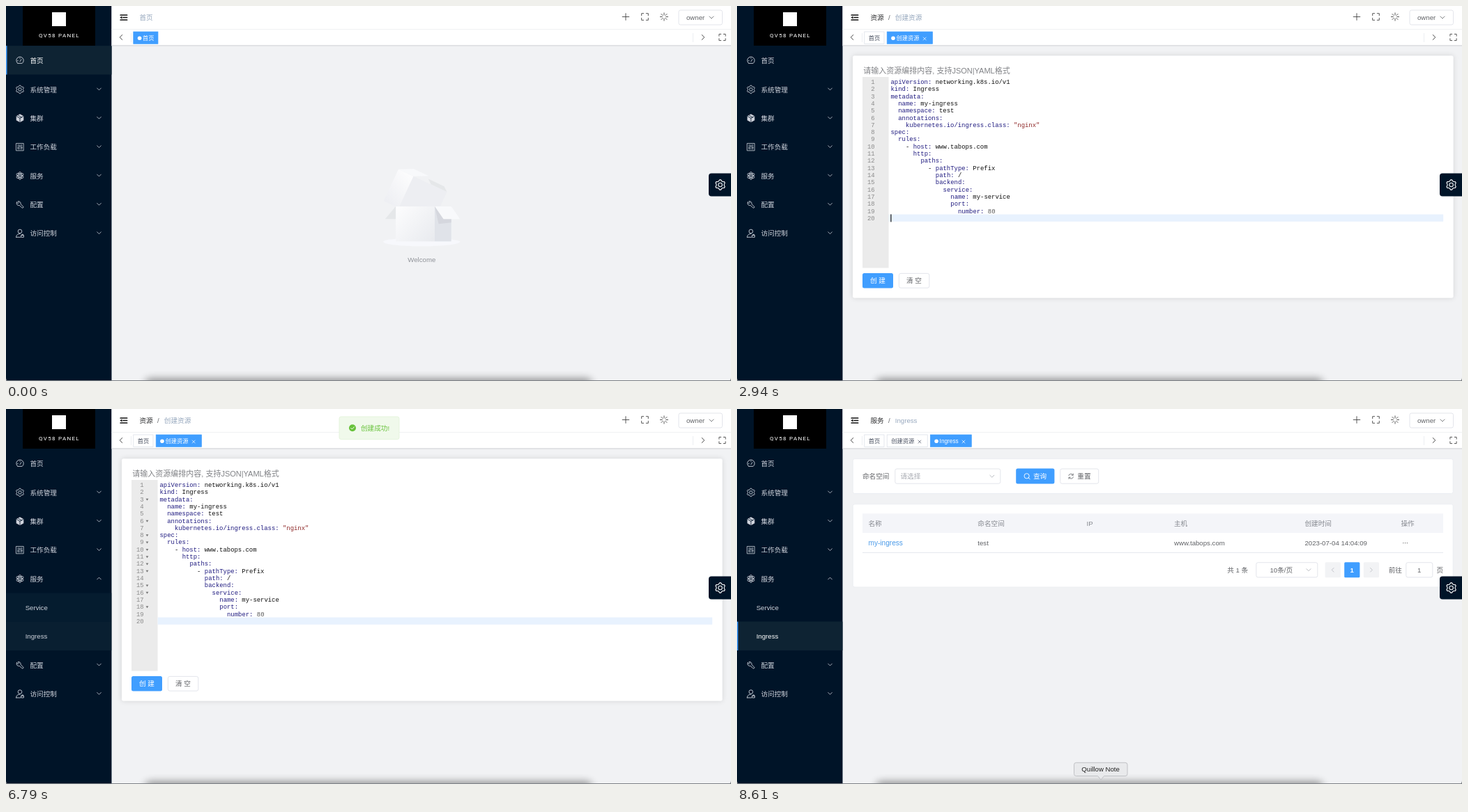
These frames come from a looping animation (1040 by 539 pixels, 9030 ms). An HTML page:

```html
<!DOCTYPE html>
<html lang="zh">
<head>
<meta charset="utf-8">
<title>Ingress</title>
<style>
html, body { margin: 0; width: 100%; height: 100%; overflow: hidden; background: #f1f2f4; }
svg { display: block; width: 1040px; height: 539px; }
text { font-family: "Liberation Sans", "Noto Sans CJK SC", "Noto Sans CJK", sans-serif; white-space: pre; }
.mono { font-family: "Liberation Mono", monospace; }
.brand { font-family: Roboto, sans-serif; letter-spacing: 1.3px; }
</style>
</head>
<body>
<svg id="stage" viewBox="0 0 1040 539" xmlns="http://www.w3.org/2000/svg"></svg>
<script>
const LOOP = 9030, NAVY = '#001428', BLUE = '#409eff', ROW = 41.35;

// Markup helpers; text y is the visual middle of the line.
const text = (x, y, s, fill = '#606266', size = 9.65, more = '') =>
  `<text x="${x}" y="${y + size * 0.37}" font-size="${size}" fill="${fill}" ${more}>${s}</text>`;
const mid = (x, y, s, fill, size, more = '') => text(x, y, s, fill, size, 'text-anchor="middle" ' + more);
const rect = (x, y, w, h, fill, more = '') =>
  `<rect x="${x}" y="${y}" width="${w}" height="${h}" fill="${fill}" ${more}/>`;
const box = (x, y, w, h, r = 2.5, fill = '#fff', stroke = '#dcdfe6') =>
  rect(x, y, w, h, fill, `rx="${r}" stroke="${stroke}" stroke-width=".8"`);
const line = (d, color, w = 0.9, more = '') =>
  `<path d="${d}" fill="none" stroke="${color}" stroke-width="${w}" stroke-linecap="round" stroke-linejoin="round" ${more}/>`;
const circle = (x, y, r, fill, more = '') => `<circle cx="${x}" cy="${y}" r="${r}" fill="${fill}" ${more}/>`;
const ring = (x, y, r, color, w = 0.9) => circle(x, y, r, 'none', `stroke="${color}" stroke-width="${w}"`);
const group = (id, body, more = '') => `<g id="${id}" ${more}>${body}</g>`;
const move = (x, y, body) => `<g transform="translate(${x} ${y})">${body}</g>`;

const down = (x, y, color, s = 3) => line(`M${x - s} ${y - s / 2}l${s} ${s}l${s} ${-s}`, color, 0.8);
const cross = (x, y, color, s = 2) =>
  line(`M${x - s} ${y - s}l${2 * s} ${2 * s}M${x + s} ${y - s}l${-2 * s} ${2 * s}`, color, 0.7);
const expand = (x, y, s = 4.8) => {
  let d = '';
  for (const a of [-1, 1]) for (const b of [-1, 1])
    d += `M${x + a * s} ${y + b * 1.8}V${y + b * s}H${x + a * 1.8}`;
  return line(d, '#444', 0.9);
};
const gear = (x, y, r, color, w) => {
  let pts = '';
  for (let i = 0; i < 24; i++) {
    const a = (i - 0.5) * Math.PI / 12 + Math.PI / 6, k = r * (i % 4 < 2 ? 1 : 0.78);
    pts += `${x + k * Math.cos(a)},${y + k * Math.sin(a)} `;
  }
  return `<polygon points="${pts}" fill="none" stroke="${color}" stroke-width="${w}" stroke-linejoin="round"/>` +
    ring(x, y, r * 0.38, color, w);
};

// Sidebar
const PALE = '#cfd3dc';
const icons = [
  line('M-3.2 4.2A5.2 5.2 0 1 1 3.2 4.2H-3.2M0 1.5L2-1.5M-3.4 .4h.6M0-3.2v.5', PALE),
  gear(0, 0, 5.8, PALE, 0.9),
  `<path d="M0-6L5.3-3V3L0 6L-5.3 3V-3Z" fill="${PALE}"/>` + line('M-4.6-2.6L0 0L4.6-2.6M0 0V5.4M-2.4-4L2.4-1.3', NAVY, 0.8),
  line('M-5.2-5.2H5.2V5.2H-5.2ZM-2.6-3.4V3.4M0-3.4V3.4M2.6-3.4V3.4M-3.4 1.4h1.6M-.8-1.4h1.6M1.8 1h1.6', PALE, 0.8),
  [30, 90, 150].map(a => `<ellipse rx="5.5" ry="2.6" fill="none" stroke="${PALE}" stroke-width=".8" transform="rotate(${a})"/>`).join('') +
    ring(0, 0, 1.3, PALE, 0.8),
  line('M-4.6-3.2L-2.6-1.6L-1.4-2.8L-2.8-4.6A3.2 3.2 0 0 1 1-.6L4.6 2.8A1.2 1.2 0 0 1 2.8 4.5L-.8 1.2A3.2 3.2 0 0 1-4.6-3.2Z', PALE),
  ring(0, -2.8, 2.8, PALE) + line('M-5.4 5.6C-5.2 2-3 .8 0 .8M-5.4 5.6H.6M2 2.8H5.4V5.6H2ZM2.8 2.8V1.6H4.6V2.8', PALE)
];
const labels = ['首页', '系统管理', '集群', '工作负载', '服务', '配置', '访问控制'];
const item = i => {
  const y = 78.2 + i * ROW + (i ? 0.4 : 0);
  return move(20, y, icons[i]) + text(34.5, y, labels[i], PALE, 9.65, i ? '' : 'id="homeLabel"') +
    (i ? group('arrow' + i, down(0, 0, PALE, 2.8), `transform="translate(133.5 ${y - 0.5})"`) : '');
};
const activeRow = (id, y) => group(id, rect(0, y, 151.5, ROW, '#0e2333') + rect(0, y, 1.5, ROW, BLUE));
const subTop = 264.3;
const sidebar =
  rect(0, 0, 151.5, 539, NAVY) + rect(24, 0, 104, 57, '#000') + rect(66, 9, 20, 20, '#fff') +
  mid(76.5, 42.5, 'QV58 PANEL', '#fff', 8, 'class="brand"') +
  activeRow('homeRow', 57.2) + [0, 1, 2, 3, 4].map(item).join('') +
  `<clipPath id="subClip"><rect id="subBox" x="0" y="${subTop}" width="151.5" height="0"/></clipPath>` +
  `<g clip-path="url(#subClip)">` +
  rect(0, subTop, 151.5, ROW, '#051c2f', 'id="hover1"') + rect(0, subTop + ROW, 151.5, ROW, '#0a2032', 'id="hover2"') +
  activeRow('ingressRow', subTop + ROW) +
  text(27.7, 285, 'Service', PALE) + text(27.7, 326.5, 'Ingress', PALE, 9.65, 'id="ingressLabel"') + '</g>' +
  group('lower', item(5) + item(6));

// Header
const crumbs = (a, b) => text(191.5, 16.5, a, '#303133') + text(217, 16.5, '/', '#606266') + text(226.8, 16.5, b, '#97a8be');
const tag = (x, w, s, live, closable) => {
  const ink = live ? '#fff' : '#495060', tx = x + (live ? 13.3 : 6);
  return rect(x, 37, w, 17.3, live ? BLUE : '#fff', `stroke="${live ? BLUE : '#d8dce5'}" stroke-width=".7"`) +
    (live ? circle(x + 8.8, 46.2, 2.8, '#fff') : '') + text(tx, 46.2, s, ink, 8.27) +
    (closable ? cross(x + w - 11.3, 47, ink) : '');
};
const spark = [0, 1, 2, 3, 4, 5, 6, 7].map(i => {
  const a = i * Math.PI / 4, c = Math.cos(a), s = Math.sin(a);
  return `M${944 + 2.6 * c} ${15.5 + 2.6 * s}L${944 + 5.6 * c} ${15.5 + 5.6 * s}`;
}).join('');
const header =
  rect(151.5, 0, 888.5, 57, '#fff') + rect(151.5, 33, 888.5, 0.8, '#eceef0') + rect(151.5, 56.3, 888.5, 1.2, '#d3d5d9') +
  line('M164.2 13H173.6M168 16.5H173.6M164.2 20H173.6', '#111', 1.7) +
  `<path d="M163.4 16.5L166.5 14.4V18.6Z" fill="#111"/>` +
  line('M884.2 15.5H893.8M889 10.7V20.3', '#444') + expand(916.5, 15.5) + line(spark, '#444') +
  box(965, 6, 62.5, 21) + text(976, 16.5, 'owner') + down(1012, 16.5, '#606266') +
  line('M166.8 41.5L163.2 45L166.8 48.5M998.2 41.5L1001.8 45L998.2 48.5', '#333') + expand(1027.5, 45, 4.6) +
  rect(179.3, 39, 0.7, 13, '#e4e7ed') + rect(985.3, 39, 0.7, 13, '#e4e7ed') +
  group('head0', text(191.5, 16.5, '首页', '#97a8be') + tag(182.8, 35.2, '首页', true)) +
  group('head1', crumbs('资源', '创建资源') + tag(182.8, 28.2, '首页') + tag(215.2, 65.3, '创建资源', true, true)) +
  group('head2', crumbs('服务', 'Ingress') + tag(182.8, 28.2, '首页') + tag(215.2, 58, '创建资源', false, true) +
    tag(277.3, 59, 'Ingress', true, true));

// Welcome page
const poly = (fill, points, more = '') => `<polygon fill="${fill}" points="${points}" ${more}/>`;
const welcome = `<g transform="translate(541 225.3) scale(1.396)">
  <path fill="#f7f8fc" d="M39.5 86C61.3 86 79 83.9 79 81.3C79 78.8 57.3 78 35.5 78C13.7 78 0 78.8 0 81.3C0 83.9 17.7 86 39.5 86Z"/>` +
  poly('#e5e7e9', '13,45 53,45 42,58 2,58') +
  '<g transform="translate(34.5 31.5) scale(-1 1) rotate(-25) translate(-27.5 -21.5)">' +
  poly('#e5e7e9', '0,7 18,7 23,3 5,3') + rect(0, 7, 38, 36, '#edeef2') + rect(38, 7, 17, 36, 'url(#sideFill)') +
  poly('#f8f9fb', '55,7 38,7 24,0 41,0') + '</g>' +
  rect(13, 45, 40, 36, 'url(#frontFill)') + rect(53, 45, 17, 36, '#e0e3e9') +
  poly('#d5d7de', '70,45 53,45 57,63 70,61.5') + poly('#f8f9fb', '70,45 53,45 62,58 79,58') + '</g>' +
  mid(596.3, 364.5, 'Welcome', '#909399');

// Editor page
const CH = 5.362, LH = 10.31;
const source = `apiVersion: networking.k8s.io/v1
kind: Ingress
metadata:
  name: my-ingress
  namespace: test
  annotations:
    kubernetes.io/ingress.class: "nginx"
spec:
  rules:
    - host: www.tabops.com
      http:
        paths:
          - pathType: Prefix
            path: /
            backend:
              service:
                name: my-service
                port:
                  number: 80
`.split('\n');
const folds = [3, 6, 8, 9, 10, 11, 12, 13, 15, 16, 18].filter(n => n !== 12).concat(12);
const lineY = n => 109 + (n - 1) * LH;
const mono = (x, y, s, fill, more = '') => text(x, y - 0.3, s, fill, CH / 0.6015, 'class="mono" ' + more);
const codeLine = (s, i) => {
  const m = s.match(/^( *)(- )?([^:]+:)(.*)$/);
  if (!m) return '';
  const [, pad, dash = '', key, value] = m;
  const ink = value.includes('"') ? '#8f2a2a' : /^ \d+$/.test(value) ? '#555' : '#111';
  return mono(220.5 + pad.length * CH, lineY(i + 1),
    `${dash}<tspan fill="#201c80">${key}</tspan><tspan fill="${ink}">${value}</tspan>`, '#111');
};
const gutterNo = n => mono(197.6, lineY(n), n, '#8b8b8b', 'text-anchor="end"');
const arrows = folds.map(n => `<path d="M200.6 ${lineY(n) - 0.9}h3.8l-1.9 3z" fill="#777"/>`).join('');
const editor =
  rect(166, 71.5, 861.5, 348, '#fff', 'rx="2.7" filter="url(#cardShadow)"') +
  text(181.3, 93, '请输入资源编排内容, 支持JSON|YAML格式', '#808286', 11) +
  rect(180, 102, 37.6, 274.5, '#ebebeb') +
  rect(217.6, 0, 795.6, LH, '#e8f2fe', 'id="current"') + gutterNo(1) +
  group('code', source.map(codeLine).join('') + source.slice(1).map((_, i) => gutterNo(i + 2)).join('')) +
  group('folds', arrows) + rect(220.3, 0, 1.2, 11, '#111', 'id="caret"') +
  rect(180, 384, 44, 21.6, BLUE, 'id="create" rx="2.5"') + mid(202, 394.8, '创 建', '#fff', 9.65, 'font-weight="500"') +
  box(232.4, 384.4, 43.4, 20.8) + mid(254, 394.8, '清 空', '#606266');

// List page
const titles = ['名称', '命名空间', 'IP', '主机', '创建时间', '操作'];
const columns = [188.5, 345.3, 501.5, 627, 814.5, 952.5];
const values = ['my-ingress', 'test', '', 'www.tabops.com', '2023-07-04 14:04:09', ''];
const list =
  box(166.2, 71.7, 861, 49.8, 2.7, '#fff', '#e9ebf0') + box(166.2, 136.8, 861, 119.2, 2.7, '#fff', '#e9ebf0') +
  text(180, 96.7, '命名空间') + box(226.8, 86, 151, 21.2) + text(234.5, 96.7, '请选择', '#a8abb2') + down(365.8, 96.7, '#a8abb2') +
  rect(400.2, 85.6, 55.2, 22, BLUE, 'rx="2.5"') + ring(415.6, 96.3, 3.6, '#fff') + line('M418.3 99L420.2 100.9', '#fff') +
  text(425, 96.7, '查询', '#fff', 9.65, 'font-weight="500"') +
  box(463.7, 86, 55, 21.2) + line('M475.8 95.6A3.4 3.4 0 0 1 482 95M482.2 93V95.2H480M482.4 97.8A3.4 3.4 0 0 1 476.2 98.4M476 100.4V98.2H478.2', '#606266', 0.8) +
  text(488.3, 96.7, '重置', '#606266', 9.65, 'font-weight="500"') +
  rect(180, 150.3, 833, 27.8, '#f4f5f9') + rect(180, 206, 833, 0.8, '#dfe3ea') +
  columns.map((x, i) => text(x, 164, titles[i], '#85888f') +
    text(x, 192, values[i], i ? '#606266' : '#4a9ae8', i ? 9.65 : 10.1)).join('') +
  [955.8, 958.6, 961.4].map(x => circle(x, 192.6, 0.7, '#666')).join('') +
  text(703.3, 231.3, '共 1 条') + box(744.8, 220.7, 88, 21.2) + text(764.5, 231.3, '10条/页') + down(820, 231.3, '#a8abb2') +
  rect(843.6, 220.3, 22.2, 22, '#f2f3f5', 'rx="1.5"') + rect(871.2, 220.3, 22.2, 22, BLUE, 'rx="1.5"') +
  rect(898.8, 220.3, 22.2, 22, '#f2f3f5', 'rx="1.5"') +
  line('M856 228.5L853.2 231.3L856 234.1M908.6 228.5L911.4 231.3L908.6 234.1', '#b4b7bd', 0.8) +
  mid(882.3, 231.3, '1', '#fff', 9.65, 'font-weight="700"') +
  text(934.7, 231.3, '前往') + box(959.8, 220.7, 38, 21.2) + mid(978.6, 231.3, '1') + text(1003.6, 231.3, '页');

// Overlays
const status = (id, w, s, size) => group(id,
  rect(-1, 524, w + 1, 16, '#dcdee1', 'rx="2" stroke="#b9bcc0" stroke-width=".7"') + text(3, 531, s, '#33363a', size));
const overlays =
  `<path d="M1040 240.5H1012a4 4 0 0 0-4 4V269.500a4 4 0 0 0 4 4H1040Z" fill="${NAVY}"/>` + gear(1024.6, 257, 7.2, '#fff', 1.1) +
  group('tip', `<path d="M889 26.800L892.500 31H885.500Z" fill="#303133"/>` + rect(864.4, 30, 49.6, 22.6, '#303133', 'rx="2.8"') +
    mid(889.2, 41.5, '创建资源', '#fff', 8.27)) +
  group('toast', box(478, 11, 86, 32.6, 2.7, '#f0f9eb', '#e1f3d8') + circle(497, 27.2, 5, '#67c23a') +
    line('M494.7 27.300L496.400 29L499.400 25.800', '#fff', 1) + text(509, 27.2, '创建成功!', '#67c23a')) +
  rect(200, 536, 640, 12, '#000', 'rx="6" opacity=".45" filter="url(#soft)"') +
  status('waiting', 348, 'Waiting for 10.192.104.101...', 8.4) +
  status('link', 199, '10.192.104.101:35999/#/k8s/services/service/list', 8.86) +
  rect(0, 538, 1040, 1, '#7d8186') +
  '<path d="M0 534Q0 539 5 539H0ZM1040 534Q1040 539 1035 539H1040Z" fill="#7d8186"/>' +
  group('dockTip', '<path d="M486.500 508.300H557a3 3 0 0 1 3 3V524.500a3 3 0 0 1-3 3H526.500L522 532.800L517.500 527.500H486.500a3 3 0 0 1-3-3V511.300a3 3 0 0 1 3-3Z" fill="#e9eaec" stroke="#b5b7ba" stroke-width=".8"/>' +
    mid(521.6, 517.8, 'Quillow Note', '#222'));

const defs = `<defs>
  <linearGradient id="sideFill" x1=".388" y1="0" x2=".612" y2="1"><stop stop-color="#fcfcfd"/><stop offset="1" stop-color="#eeeff3"/></linearGradient>
  <linearGradient id="frontFill" x1="0" y1=".095" x2="1" y2=".905"><stop stop-color="#fcfcfd"/><stop offset="1" stop-color="#e9ebef"/></linearGradient>
  <filter id="cardShadow" x="-5%" y="-5%" width="110%" height="110%"><feDropShadow dx="0" dy="0" stdDeviation="3.500" flood-opacity=".14"/></filter>
  <filter id="soft" x="-10%" y="-300%" width="120%" height="700%"><feGaussianBlur stdDeviation="6"/></filter>
</defs>`;

const stage = document.getElementById('stage');
stage.innerHTML = defs + rect(0, 0, 1040, 539, '#f1f2f4') +
  group('page0', welcome) + group('page1', editor) + group('page2', list) + sidebar + header + overlays;

const el = {};
stage.querySelectorAll('[id]').forEach(n => el[n.id] = n);

// Timing
const clamp = v => Math.max(0, Math.min(1, v));
const ease = x => {
  let lo = 0, hi = 1, s = 0.5;
  for (let i = 0; i < 20; i++) {
    s = (lo + hi) / 2;
    if (0.75 * s * (1 - s) + s ** 3 < x) lo = s; else hi = s;
  }
  return 0.3 * s * (1 - s) ** 2 + 3 * s * s * (1 - s) + s ** 3;
};
const ramp = (t, from, ms) => {
  const p = clamp((t - from) / ms);
  return p <= 0 ? 0 : p >= 1 ? 1 : ease(p);
};
const REST = [64, 158, 255], HOVER = [121, 187, 255], PRESS = [51, 126, 204];
const buttonKeys = [[0, REST], [3630, REST], [3730, HOVER], [3910, HOVER], [4000, PRESS], [4060, PRESS],
  [4210, HOVER], [5935, HOVER], [6035, REST], [LOOP, REST]];
const buttonColor = t => {
  const i = buttonKeys.findIndex(k => k[0] > t);
  const [t0, a] = buttonKeys[i - 1], [t1, b] = buttonKeys[i], p = (t - t0) / (t1 - t0);
  return `rgb(${a.map((v, j) => Math.round(v + (b[j] - v) * p))})`;
};
const alpha = (id, v) => {
  el[id].setAttribute('opacity', v);
  el[id].style.display = v > 0 ? '' : 'none';
};

function draw(t) {
  const route = t < 1400 ? 0 : t < 7210 ? 1 : 2;
  for (let i = 0; i < 3; i++) alpha('head' + i, route === i ? 1 : 0);
  alpha('page0', 1 - ramp(t, 1390, 360));
  alpha('page1', ramp(t, 1760, 360) - ramp(t, 7200, 430));
  alpha('page2', ramp(t, 7670, 370));

  alpha('homeRow', route === 0 ? 1 : 0);
  el.homeLabel.setAttribute('fill', route === 0 ? '#fff' : PALE);
  const open = ramp(t, 6070, 300), drop = open * 2 * ROW;
  el.subBox.setAttribute('height', drop);
  el.lower.setAttribute('transform', `translate(0 ${drop})`);
  el.arrow4.setAttribute('transform', `translate(133.5 ${243.5}) rotate(${180 * open})`);
  alpha('hover1', ramp(t, 6490, 100) * (route === 2 ? 0 : 1));
  alpha('hover2', ramp(t, 6700, 100));
  alpha('ingressRow', route === 2 ? 1 : 0);
  el.ingressLabel.setAttribute('fill', route === 2 ? '#fff' : PALE);

  const pasted = t >= 2940, caretLine = pasted ? 20 : 1;
  alpha('code', pasted ? 1 : 0);
  alpha('folds', t >= 3360 ? 1 : 0);
  alpha('caret', t >= 2660 && t < 3500 ? 1 : 0);
  el.caret.setAttribute('y', lineY(caretLine) - 5.5);
  el.current.setAttribute('y', lineY(caretLine) - 5.4);
  el.create.setAttribute('fill', buttonColor(t));

  alpha('tip', ramp(t, 1030, 230) - ramp(t, 1890, 210));
  alpha('waiting', ramp(t, 1470, 120) - clamp((t - 1640) / 215));
  alpha('link', ramp(t, 7270, 120) - clamp((t - 7790) / 250));
  const slide = ramp(t, 4260, 420) - ramp(t, 7230, 400);
  alpha('toast', clamp(ramp(t, 4260, 310) - ramp(t, 7230, 310)));
  el.toast.setAttribute('transform', `translate(0 ${-33 * (1 - slide)})`);
  alpha('dockTip', t >= 8610 ? 1 : 0);
}

const start = performance.now();
function tick() {
  draw((performance.now() - start) % LOOP);
  requestAnimationFrame(tick);
}
tick();
</script>
</body>
</html>
```
